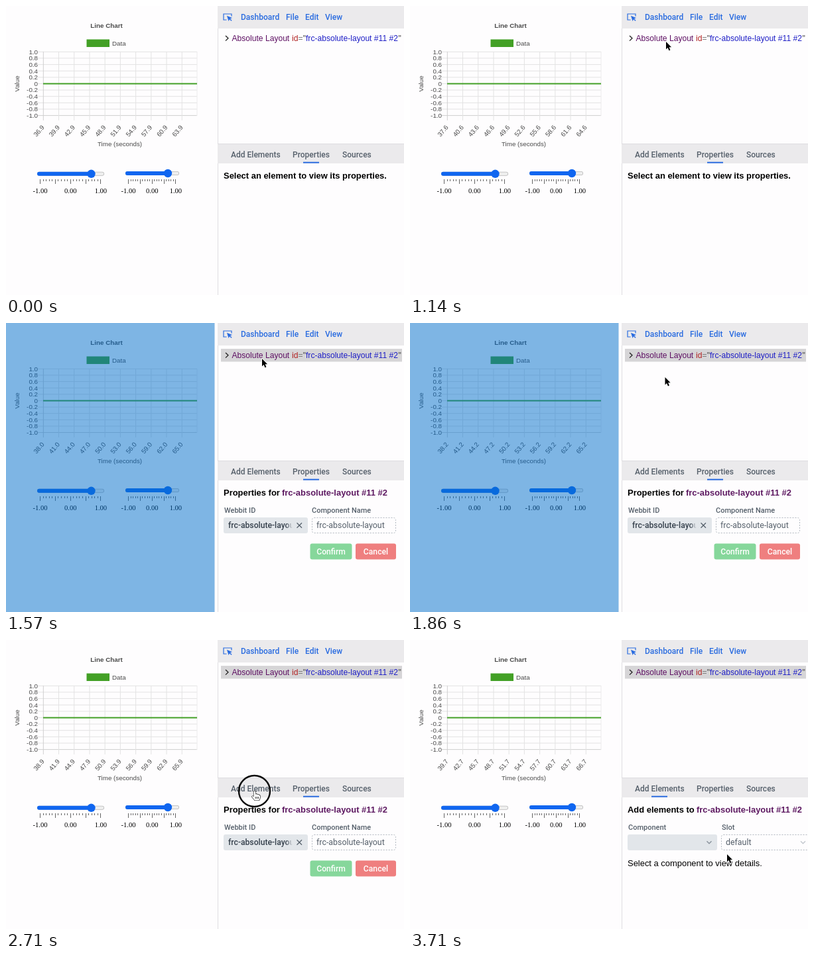
Recreate the animation shown at these times as an HTML page with a canvas. Size 600 by 437 pixels, loop 3850 ms.

```html
<!DOCTYPE html>
<html lang="en">
<head>
<meta charset="utf-8">
<style>
html, body { margin: 0; width: 100%; height: 100%; overflow: hidden; background: #fefdfe; }
canvas { display: block; }
</style>
</head>
<body>
<canvas id="stage" width="600" height="437"></canvas>
<script>
const ctx = document.getElementById('stage').getContext('2d');
const LOOP = 3850, TICK = 1000 / 7;
const ARIAL = '"Liberation Sans", Arial, sans-serif';
const UI = 'Roboto, sans-serif';
const SERIF = '"Liberation Serif", serif';
const BLUE = '#2a6ce0', SLIDER = '#1066f0', GREEN = '#43a026', GRAY = '#56606b', INK = '#4a4a4a';
const BAR = '#ebeaec', FIELD = '#e2e6ea', PURPLE = '#5e1a62';
const ID = 'frc-absolute-layout #11 #2';

// Keys are [tick, value, ...]
const cursorKeys = [[1, 582, 264], [7, 385, 53], [12, 385, 53], [13, 383.5, 81], [14, 380, 196],
  [16, 374, 227], [21, 374, 227], [26, 477, 323]];
const clockKeys = [[0, 36.9], [9, 37.7], [13, 38.2], [14, 38.4], [26, 39.7]];
const smooth = u => u * u * (3 - 2 * u);

function sample(keys, n, ease = u => u) {
  const i = Math.max(1, keys.findIndex(k => k[0] >= n));
  const a = keys[i - 1], b = keys[i];
  const u = ease((n - a[0]) / (b[0] - a[0]));
  return a.slice(1).map((v, j) => v + (b[j + 1] - v) * u);
}

function rect(x, y, w, h, color, r = 0) {
  ctx.fillStyle = color;
  ctx.beginPath();
  ctx.roundRect(x, y, w, h, r);
  ctx.fill();
}

function line(points, color, width = 1) {
  ctx.strokeStyle = color;
  ctx.lineWidth = width;
  ctx.beginPath();
  points.forEach(p => ctx.lineTo(...p));
  ctx.stroke();
}

function disc(x, y, r, color) {
  ctx.fillStyle = color;
  ctx.beginPath();
  ctx.arc(x, y, r, 0, 7);
  ctx.fill();
}

function text(str, x, y, size, color, family = ARIAL, weight = 400, align = 'left') {
  ctx.font = `${weight} ${size}px ${family}`;
  ctx.fillStyle = color;
  ctx.textAlign = align;
  ctx.fillText(str, x, y);
}

function turnedText(str, x, y, degrees, align) {
  ctx.save();
  ctx.translate(x, y);
  ctx.rotate(degrees * Math.PI / 180);
  text(str, 0, 3.5, 9.8, INK, ARIAL, 400, align);
  ctx.restore();
}

function chart(start) {
  const label = (s, x, y, align, weight) => text(s, x, y, 9.8, INK, ARIAL, weight, align);
  label('Line Chart', 151.5, 33, 'center', 700);
  rect(121.5, 50.5, 34.5, 11.5, GREEN);
  label('Data', 160, 60);
  for (let i = 0; i <= 10; i++) {
    const y = 69.3 + i * 9.63, value = (5 - i) / 5;
    line([[48, y], [288, y]], i === 10 ? '#cfcfcf' : '#e3e3e3');
    label(value ? value.toFixed(1) : '0', 48, y + 3.4, 'right');
  }
  for (let i = 0; i < 10; i++) {
    const x = 56.3 + i * 23.22;
    line([[x, 69], [x, 173]], i ? '#e3e3e3' : '#cfcfcf');
    turnedText((start + i * 3).toFixed(1), x - 0.8, 181.5, -50, 'right');
  }
  line([[288, 69], [288, 166]], '#ececec');
  line([[56, 117.6], [288, 117.6]], GREEN, 2);
  turnedText('Value', 16, 117.5, -90, 'center');
  label('Time (seconds)', 171.5, 212.3, 'center');
}

function slider(left, right, thumb, y) {
  rect(left, y - 3, right - left, 6, '#b8b8b8', 3);
  rect(left + 0.7, y - 2.3, right - left - 1.4, 4.6, '#efefef', 2.3);
  rect(left, y - 3, thumb - left, 6, SLIDER, 3);
  disc(thumb, y, 6.2, SLIDER);
  const first = left + 4.5, span = right - left - 9.6;
  for (let i = 0; i <= 20; i++) {
    const x = Math.floor(first + span * i / 20) + 0.5;
    line([[x, 262], [x, i % 5 ? 265 : 269]], '#666');
  }
  ['-1.00', '0.00', '1.00'].forEach((s, i) =>
    text(s, first + span * i / 2, 282.5, 10.6, '#000', SERIF, 400, 'center'));
}

function header() {
  rect(319, 0, 281, 34, BAR);
  line([[340, 15.5], [340, 12], [328, 12], [328, 21], [332.5, 21]], BLUE, 1.2);
  ctx.fillStyle = BLUE;
  ctx.fill(new Path2D('M333 14.8 341 18 338 19.2 340.6 21.8 339.6 22.8 337 20.2 335.6 23Z'));
  [['Dashboard', 354], ['File', 422], ['Edit', 451], ['View', 481]].forEach(([s, x]) =>
    text(s, x, 21, 12, BLUE, UI, 500));
}

function tree(rowColor) {
  if (rowColor) rect(324, 39, 273, 19.5, rowColor);
  line([[331, 45], [335, 48.8], [331, 52.6]], '#222', 1.3);
  text('Absolute Layout', 340.5, 53.3, 12.1, '#5e1063');
  text('id', 431, 53.3, 12.1, '#b02020');
  text('=', 440.6, 53.3, 12.1, '#777');
  text('"', 447.7, 53.3, 12.1, '#444');
  text(ID, 452, 53.3, 12.1, '#1f1fc6');
  text('"', 591.5, 53.3, 12.1, '#444');
}

function tabs(active) {
  rect(319, 208, 281, 30, BAR);
  line([[319, 208.5], [600, 208.5]], '#dddce0');
  [['Add Elements', 339], ['Properties', 432], ['Sources', 507]].forEach(([s, x]) =>
    text(s, x, 228.5, 12, GRAY, UI, 500));
  rect(active - 12, 235.7, 24, 2, BLUE);
}

function heading(lead, x) {
  text(lead, 328, 261, 12.95, '#000', ARIAL, 700);
  if (x) text(ID, x, 261, 12.95, PURPLE, ARIAL, 700);
}

function dashedField(x, w, value, valueX) {
  ctx.setLineDash([2, 2]);
  ctx.strokeStyle = '#b0b7bf';
  ctx.lineWidth = 1;
  ctx.beginPath();
  ctx.roundRect(x + 0.5, 294.5, w - 1, 23, 3);
  ctx.stroke();
  ctx.setLineDash([]);
  text(value, valueX, 310.3, 12.4, GRAY, UI);
}

const fieldLabel = (s, x) => text(s, x, 286.5, 11, GRAY, UI, 500);
const chevron = (x, color) => line([[x - 3.5, 304.2], [x, 307.8], [x + 3.5, 304.2]], color, 1.4);

function propertiesPanel() {
  heading('Properties for', 416);
  fieldLabel('Webbit ID', 329);
  rect(328, 294, 127, 24, FIELD, 3);
  const fade = ctx.createLinearGradient(422, 0, 432, 0);
  fade.addColorStop(0, '#36414d');
  fade.addColorStop(1, '#36414d00');
  text('frc-absolute-layout', 335, 310.3, 12.2, fade, UI, 500);
  line([[438.5, 302.2], [446, 309.7]], GRAY, 1.3);
  line([[446, 302.2], [438.5, 309.7]], GRAY, 1.3);
  fieldLabel('Component Name', 461);
  dashedField(461, 127, 'frc-absolute-layout', 468);
  [['Confirm', 458.5, 63, '#86d79b'], ['Cancel', 527, 61, '#ef7f7f']].forEach(([s, x, w, color]) => {
    rect(x, 333.5, w, 24, color, 3);
    text(s, x + w / 2, 350.3, 12.2, '#fff', UI, 500, 'center');
  });
}

function addPanel() {
  heading('Add elements to', 432);
  fieldLabel('Component', 329);
  rect(328, 294, 135, 24, FIELD, 3);
  chevron(451, '#8a939d');
  fieldLabel('Slot', 470);
  dashedField(469, 135, 'default', 476);
  chevron(592.5, '#c3c8ce');
  text('Select a component to view details.', 328, 341.5, 12.95, '#000');
}

const ARROW = new Path2D('M0 0V11.4L2.6 9 4.5 13.4 6.4 12.6 4.6 8.2H8.1Z');
const HAND = new Path2D('M-1.5 1.2Q0-.6 1.4 1.2V5.4Q3 4.4 4 5.8 5.6 5 6.3 6.5 8 6.2 8 8V11L6.6 14.5H0L-4.2 9.2Q-4 7-1.5 9Z');

function pointer(x, y) {
  const onTab = x > 332 && x < 420 && y > 208 && y < 238;
  ctx.save();
  ctx.translate(x + 1, y + 1);
  ctx.lineJoin = 'round';
  ctx.lineWidth = onTab ? 1.2 : 1.8;
  ctx.strokeStyle = onTab ? '#000' : '#fff';
  ctx.fillStyle = onTab ? '#fff' : '#000';
  const shape = onTab ? HAND : ARROW;
  ctx.stroke(shape);
  ctx.fill(shape);
  if (onTab) [1.2, 3.4, 5.6].forEach(fold => line([[fold, 9], [fold, 12]], '#000', 0.8));
  ctx.restore();
}

function clickRing(x, y, age) {
  if (age < 0 || age > 1) return;
  ctx.strokeStyle = '#0a0a0a';
  ctx.lineWidth = 2.4;
  ctx.beginPath();
  ctx.arc(x + 0.5, y + 1.5, 16 + 7.5 * age, 0, 7);
  ctx.stroke();
}

function draw(n) {
  rect(0, 0, 600, 437, '#fefdfe');
  chart(sample(clockKeys, n)[0]);
  slider(47, 148, 128.5, 253.8);
  slider(180, 261, 244, 253);
  if (n >= 9 && n <= 13) rect(0, 0, 314.5, 437, 'rgba(1,111,203,.5)');
  line([[319.5, 0], [319.5, 437]], '#dfdee2');

  const selected = n >= 11, adding = n >= 20;
  header();
  tree(selected ? '#d6d5d7' : n >= 9 && '#efeff0');
  tabs(adding ? 376 : 460);
  if (adding) addPanel();
  else if (selected) propertiesPanel();
  else heading('Select an element to view its properties.');

  if (n < 1) return;
  const [x, y] = sample(cursorKeys, n, smooth);
  pointer(x, y);
  clickRing(x, y, n - 9);
  clickRing(x, y, n - 18);
}

function frame() {
  const t = performance.now() % LOOP;
  draw(Math.min(26, Math.floor((t + 5) / TICK)));
  requestAnimationFrame(frame);
}
frame();
</script>
</body>
</html>
```
